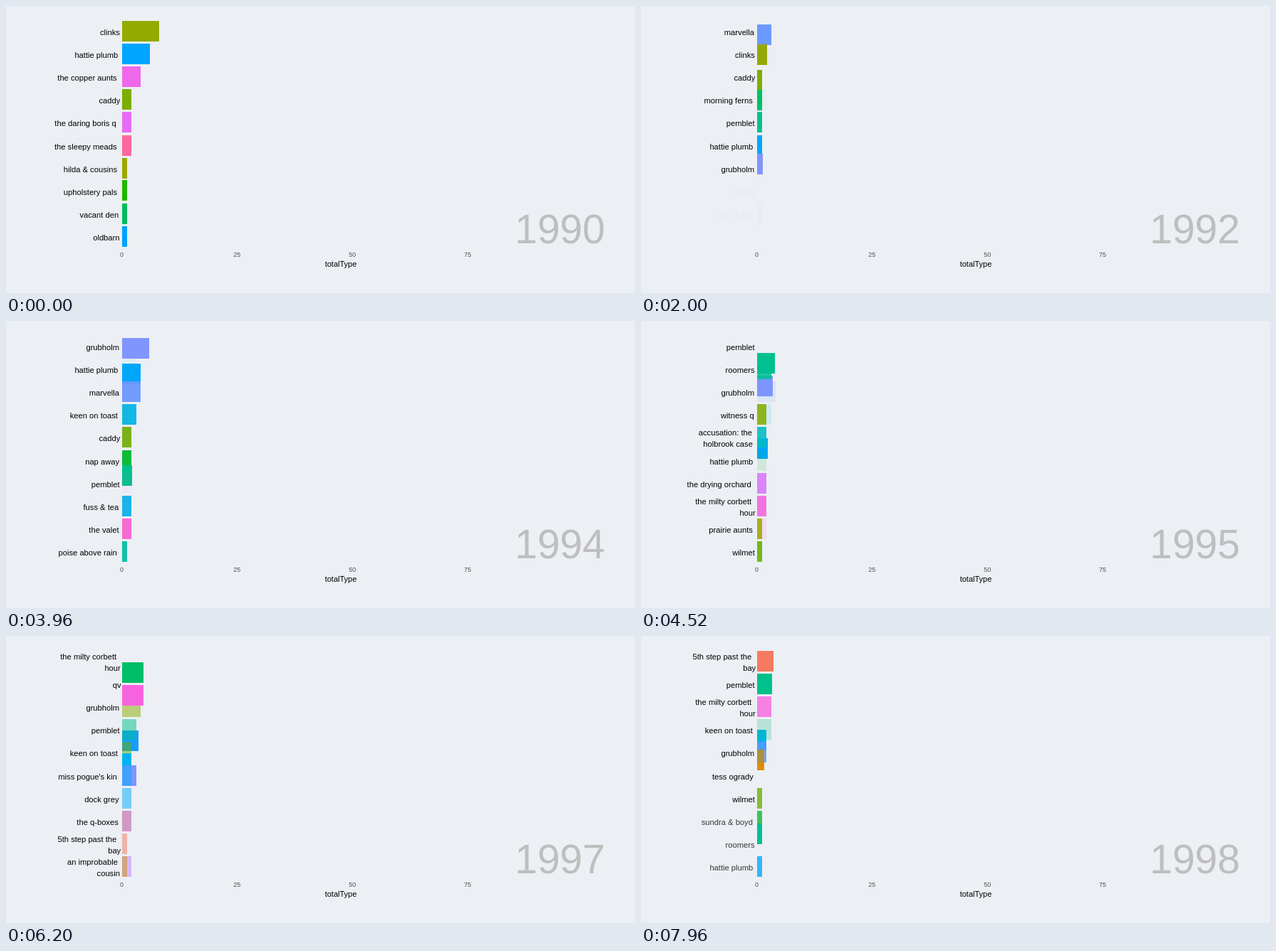
Recreate the animation shown at these times as an HTML page with a canvas. Size 883 by 404 pixels, loop 8 s.

```html
<!DOCTYPE html>
<html lang="en">
<head>
<meta charset="utf-8">
<title>Bar chart race</title>
<style>
  html, body { margin: 0; width: 100%; height: 100%; overflow: hidden; background: #eceff4; }
  canvas { display: block; }
</style>
</head>
<body>
<canvas id="stage" width="883" height="404"></canvas>
<script>
const ctx = document.getElementById('stage').getContext('2d');
const FONT = '"Liberation Sans", Arial, sans-serif';
const LOOP = 8000, STEP = 40, STEPS_PER_YEAR = 24, FIRST_YEAR = 1990;
const AXIS_X = 163, UNIT = 6.473, TOP = 20.9, PITCH = 32.13, BAR_HEIGHT = 29;

// "/" marks a line break in a label.
const colors = {
  '5th step past the/bay': '#f47b5f',
  'tess ogrady': '#dd8d00',
  'an improbable/cousin': '#d39200',
  'tinmouth tunnel': '#aaa300',
  'prairie aunts': '#a3a500',
  'hilda & cousins': '#9ba800',
  'clinks': '#93aa00',
  'dunmere ward': '#8cab00',
  'witness q': '#84ad00',
  'caddy': '#7cae00',
  'wilmet': '#69b000',
  'upholstery pals': '#1fb700',
  'sundra & boyd': '#0cb72f',
  'nap away': '#00b92e',
  'vacant den': '#00bc5b',
  'qv': '#00be67',
  'morning ferns': '#00be6c',
  'cousin ned': '#00b975',
  'pemblet': '#00c08b',
  'roomers': '#00c094',
  'poise above rain': '#00c0a8',
  'accusation: the/holbrook case': '#00bdc4',
  'fuss & tea': '#00b7e9',
  'keen on toast': '#00b4f0',
  'miss pogue\'s kin': '#00acfb',
  'felony six': '#00a9ff',
  'hattie plumb': '#00a5ff',
  'oldbarn': '#00a1ff',
  'plain sailing': '#009eff',
  'dock grey': '#149eff',
  'volkanov': '#5b9dff',
  'marvella': '#6b99ff',
  'grubholm': '#8095ff',
  'leopold harringay\'s/a handcart called/regret': '#be80ff',
  'the drying orchard': '#d776fc',
  'the daring boris q': '#e76bf3',
  'the copper aunts': '#ef67eb',
  'the milty corbett/hour': '#f763df',
  'the valet': '#fb61d7',
  'the sleepy meads': '#ff689e',
  'the q-boxes': '#ff6c91'
};

// One ranking per year, best first.
const years = [
  '8 clinks, 6 hattie plumb, 4 the copper aunts, 2 caddy, 2 the daring boris q, 2 the sleepy meads, 1 hilda & cousins, 1 upholstery pals, 1 vacant den, 1 oldbarn',
  '8 clinks, 4 hattie plumb, 3 upholstery pals, 2 the copper aunts, 1 caddy, 1 vacant den, 1 morning ferns, 1 oldbarn, 1 marvella, 1 grubholm',
  '3 marvella, 2 clinks, 1 caddy, 1 morning ferns, 1 pemblet, 1 hattie plumb, 1 grubholm',
  '4 grubholm, 4 the milty corbett/hour, 3 clinks, 2 nap away, 2 morning ferns, 2 marvella, 1 tinmouth tunnel, 1 caddy, 1 fuss & tea',
  '6 grubholm, 4 hattie plumb, 4 marvella, 3 keen on toast, 2 caddy, 2 nap away, 2 pemblet, 2 fuss & tea, 2 the valet, 1 poise above rain',
  '4 pemblet, 3 roomers, 3 grubholm, 2 witness q, 2 accusation: the/holbrook case, 2 hattie plumb, 2 the drying orchard, 2 the milty corbett/hour, 1 prairie aunts, 1 wilmet',
  '5 qv, 5 dock grey, 4 dunmere ward, 4 the milty corbett/hour, 2 wilmet, 2 keen on toast, 2 felony six, 2 volkanov, 2 grubholm, 2 leopold harringay\'s/a handcart called/regret',
  '5 the milty corbett/hour, 4 qv, 4 grubholm, 3 pemblet, 2 keen on toast, 2 miss pogue\'s kin, 2 dock grey, 2 the q-boxes, 1 5th step past the/bay, 1 an improbable/cousin',
  '3 5th step past the/bay, 3 pemblet, 3 the milty corbett/hour, 2 keen on toast, 2 grubholm, 1 tess ogrady, 1 wilmet, 1 sundra & boyd, 1 roomers, 1 hattie plumb',
  '5 5th step past the/bay, 4 pemblet, 3 tess ogrady, 3 cousin ned, 2 plain sailing, 2 keen on toast, 1 roomers'
].map(line => line.split(', ').map((entry, row) => ({
  name: entry.slice(2), value: +entry[0], row
})));

const quadInOut = p => p < 0.5 ? 2 * p * p : 1 - 2 * (1 - p) ** 2;
const mix = (a, b, f) => a + (b - a) * f;

function text(string, x, y, size, color, align) {
  ctx.font = `${size}px ${FONT}`;
  ctx.fillStyle = color;
  ctx.textAlign = align;
  ctx.fillText(string, x, y);
}

function bar(name, row, value, alpha) {
  ctx.globalAlpha = alpha;
  ctx.fillStyle = colors[name];
  const width = Math.ceil(UNIT * value);
  ctx.fillRect(AXIS_X, Math.round(TOP + PITCH * row), width, BAR_HEIGHT);
}

function label(name, row, alpha) {
  ctx.globalAlpha = alpha;
  const lines = name.split('/');
  const middle = Math.round(TOP + PITCH * row) + 20;
  lines.forEach((line, i) => text(line, 162.5 - 0.43 * line.length,
    middle + 16 * (i - (lines.length - 1) / 2), 11.2, '#000', 'right'));
}

// Bars already present stack in their old order; new ones fade in on top.
function drawBars(from, to, f) {
  const findIn = (list, item) => list.find(other => other.name === item.name);
  for (const a of from) {
    const b = findIn(to, a);
    if (b) bar(a.name, mix(a.row, b.row, f), mix(a.value, b.value, f), 1);
    else bar(a.name, a.row, a.value, 1 - f);
  }
  for (const b of to) if (!findIn(from, b)) bar(b.name, b.row, b.value, f);
}

// Labels belong to rows: the text swaps halfway, unpaired rows fade.
function drawLabels(from, to, f) {
  for (let row = 0; row < 10; row++) {
    const a = from[row], b = to[row];
    if (a && b) label((f < 0.5 ? a : b).name, row, 1);
    else if (a) label(a.name, row, 1 - f);
    else if (b) label(b.name, row, f);
  }
}

function draw(time) {
  const progress = (Math.floor(time % LOOP / STEP) + 1) / STEPS_PER_YEAR;
  const index = Math.floor(progress);
  const f = quadInOut(progress - index);
  const from = years[index], to = years[index + 1];

  ctx.globalAlpha = 1;
  ctx.fillStyle = '#eceff4';
  ctx.fillRect(0, 0, 883, 404);
  drawBars(from, to, f);
  drawLabels(from, to, f);

  ctx.globalAlpha = 1;
  text(FIRST_YEAR + index + (f < 0.5 ? 0 : 1), 841, 334, 57, '#bebebe', 'right');
  for (const tick of [0, 25, 50, 75]) {
    text(tick, AXIS_X - 0.5 + UNIT * tick, 353, 9, '#4d4d4d', 'center');
  }
  text('totalType', 470, 367, 11, '#000', 'center');
}

const start = performance.now();
function tick() {
  draw(performance.now() - start);
  requestAnimationFrame(tick);
}
tick();
</script>
</body>
</html>
```
